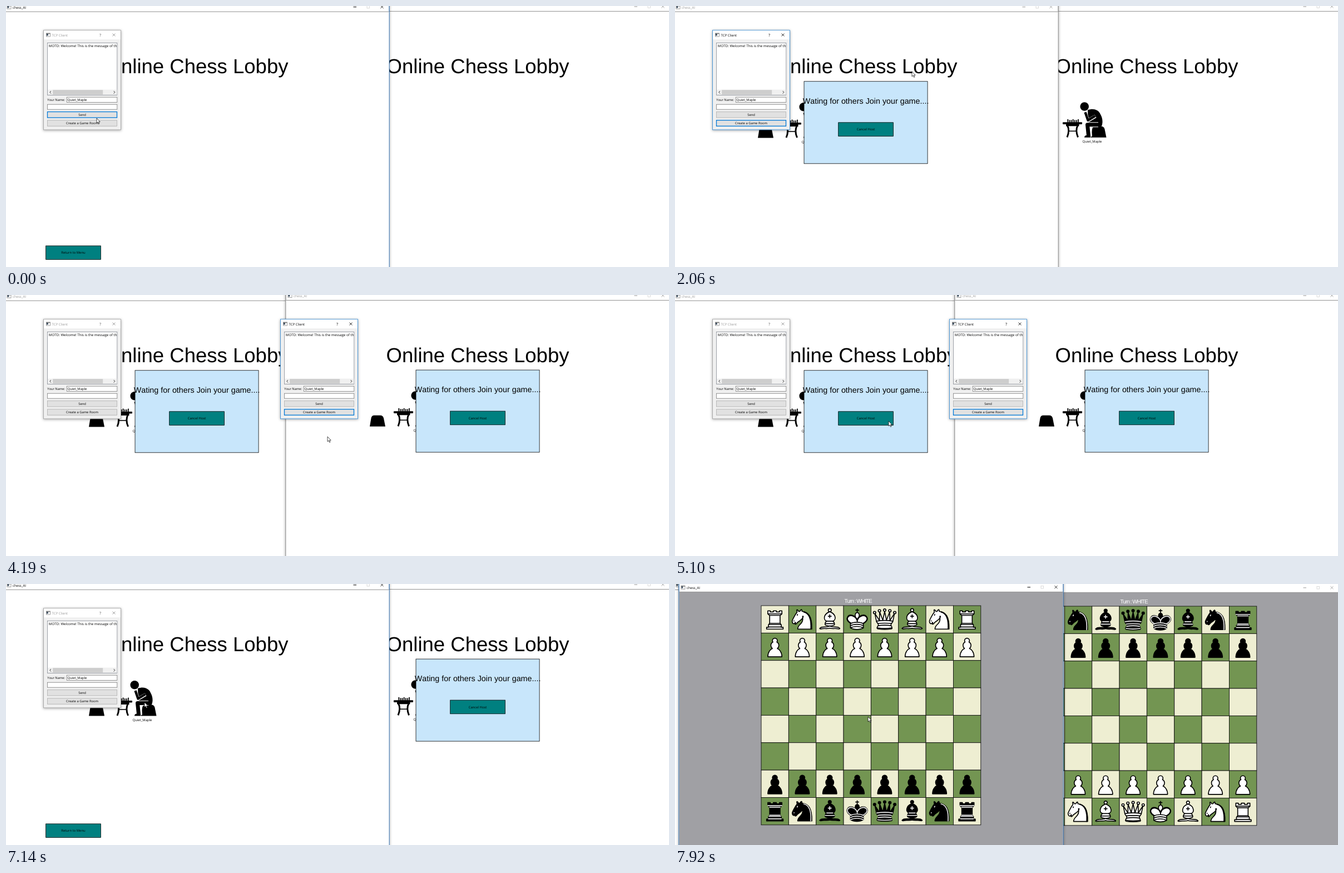
Recreate the animation shown at these times as an HTML page. Size 1192 by 470 pixels, loop 8 s.

```html
<!DOCTYPE html>
<html lang="en">
<head>
<meta charset="utf-8">
<title>Online Chess Lobby</title>
<style>
  html, body { margin: 0; width: 100%; height: 100%; overflow: hidden; background: #fff; }
  svg { display: block; width: 100vw; height: 100vh; }
  text { text-rendering: geometricPrecision; font-kerning: none; white-space: pre; }
  .ui { font-family: "Open Sans", "Noto Sans", sans-serif; }
  .big { font-family: "Liberation Sans", Arial, sans-serif; }
  .shadow { filter: drop-shadow(0 1px 2.5px rgba(0, 0, 0, .35)); }
</style>
</head>
<body>
<svg viewBox="0 0 1192 470">
  <g id="scene"></g>
  <path id="cursor" d="M0 0V9L2.1 7.1L3.6 10.4L5 9.8L3.6 6.6H6.2Z" fill="#fff" stroke="#000" stroke-width=".7"/>
</svg>
<script>
const LOOP = 8000;
const PLAYER = 'Quiet_Maple';
const INK = '#000', DIM = '#999', BLUE = '#0078d7', TEAL = '#008080';

// Moments at which the interface changes state
const AT = {
  hover1: 90, focus1: 470, host1: 704, raise2: 2430, hover2: 3290,
  focus2: 3520, host2: 3790, raise1: 5180, cancel1: 5330, game: 7220
};

// Pointer runs: start, end, number of steps, then [progress, x, y] waypoints
const RUNS = [
  [90, 320, 4, [[1, 150, 211]]],
  [470, 1250, 11, [[.3, 150, 211], [1, 365, 187]]],
  [1320, 2110, 11, [[.5, 787, 140], [.909, 426, 118], [1, 400, 90]]],
  [2200, 2660, 7, [[.5, 720, 150], [1, 700, 190]]],
  [2820, 3600, 11, [[.727, 567, 208], [1, 567, 210]]],
  [3700, 4500, 10, [[.2, 567, 210], [.6, 578, 255], [1, 521, 318]]],
  [4570, 4950, 6, [[1, 393, 235]]],
  [5100, 5330, 4, [[.5, 375, 219], [1, 375, 219]]],
  [5520, 6030, 8, [[.25, 401, 243], [.6, 407, 260], [1, 395, 271]]],
  [6350, 6820, 7, [[1, 249, 219]]],
  [7140, 7220, 2, [[.5, 249, 213], [1, 248, 208]]],
  [7600, 7920, 5, [[1, 347, 239]]]
];

function pointer(t) {
  let pos = [163, 202];
  for (const [a, b, n, way] of RUNS) {
    if (t < a) break;
    const p = Math.min(n, Math.floor((t - a) / (b - a) * (n - 1) + 1e-6) + 1) / n;
    let p0 = 0;
    for (const [p1, x, y] of way) {
      const f = Math.min(1, (p - p0) / (p1 - p0));
      pos = [pos[0] + (x - pos[0]) * f, pos[1] + (y - pos[1]) * f];
      if (p <= p1) break;
      p0 = p1;
    }
  }
  return pos;
}

const group = (x, y, body, scale = 1) => `<g transform="translate(${x} ${y}) scale(${scale})">${body}</g>`;
const rect = (x, y, w, h, fill, stroke = 'none', sw = 1, extra = '') =>
  `<rect x="${x}" y="${y}" width="${w}" height="${h}" fill="${fill}" stroke="${stroke}" stroke-width="${sw}" ${extra}/>`;
const line = (d, stroke, sw = 1) => `<path d="${d}" fill="none" stroke="${stroke}" stroke-width="${sw}" stroke-linejoin="round"/>`;
const shape = d => `<path d="${d}"/>`;
const label = (x, y, s, size = 5.9, fill = INK, anchor = 'start', cls = 'ui', extra = '') =>
  `<text class="${cls}" x="${x}" y="${y}" font-size="${size}" fill="${fill}" text-anchor="${anchor}" ${extra}>${s}</text>`;
const cross = (x, y, r, c) => line(`M${x - r} ${y - r}l${2 * r} ${2 * r}m0 ${-2 * r}l${-2 * r} ${2 * r}`, c, .8);
const icon = (x, y) => rect(x, y, 7, 6, '#fff', '#888', .8) + rect(x + .4, y + .4, 3, 4, '#456') + rect(x, y, 7, 1.3, '#777');

function frame(x, y, active, bg, body) {
  const c = active ? INK : DIM;
  return group(x, y,
    rect(-2, -20, 691, 520, '#fff', active ? '#2b6cb0' : '#858585', 1.2, 'class="shadow"') +
    rect(-1.4, 10.2, 689.8, 480, bg) +
    line('M-1.4 10.3H688.4', '#909090') +
    icon(2, -.8) + label(12, 4.5, 'chess_AI', 6.05, c) +
    line('M624.5 1.8h5.5', c) + rect(649, -.6, 4.6, 4.6, 'none', '#ccc', .7) + cross(676, 1.6, 2.6, c) + body);
}

// The lobby is laid out on a 1400 by 900 canvas shown at about half size
const canvas = body => group(-2.4, 12.4, body, .4935);
const tealButton = (x, y, s) => rect(x, y, 200, 50, TEAL, INK, 1.6) + label(x + 100, y + 29.3, s, 12, INK, 'middle');
const hostBox = () => rect(475, 250, 450, 300, '#c8e6fb', INK, 1.6) +
  label(700, 331, 'Wating for others Join your game....', 29, INK, 'middle', 'big') +
  tealButton(600, 400, 'Cancel Host');

function thinker() {
  const stool = 'M0 20L2.5 5Q3.5 0 8 0H19Q23.5 0 25 5L28 20Z';
  let men = '';
  for (let i = 0; i < 7; i++) {
    const x = 200.5 + i * 3.1, y = i % 3 ? 207 : 205.5;
    men += rect(x, y, 1.7, 5, INK) + `<circle cx="${x + .85}" cy="${y}" r="1"/>`;
  }
  return group(149, 217.5, shape(stool)) + men +
    rect(192, 210, 35, 3.6, INK, 'none', 1, 'rx="1"') +
    rect(198, 213, 23.5, 4, INK) +
    line('M200 215C204 222 203 230 200 237M219.5 215C215.5 222 216.5 230 219.5 237', INK, 3) +
    line('M202 226H218', INK, 1.6) +
    group(242.5, 217.5, shape(stool)) +
    shape('M237 188C248 184 257 188 260 196C264 203 265 212 261 219H238Z') +
    line('M256 214.5H239L240.5 236', '#fff', 9) +
    line('M256 214.5H236.5L238.5 234', INK, 7) +
    shape('M231 237.5Q231 234 235 233.5H242V237.5Z') +
    line('M233 194L237.5 207L251 199', '#fff', 6) +
    line('M232.5 192L237.5 206.5L250.5 198.5', INK, 4.4) +
    '<circle cx="231.2" cy="181.7" r="7.8"/>' +
    label(227.6, 247, PLAYER);
}

const lobby = (games, hosting) =>
  canvas(label(700, 220.5, 'Online Chess Lobby', 74, INK, 'middle', 'big')) +
  (games ? thinker() : '') +
  canvas(hosting ? hostBox() : tealButton(150, 850, 'Return to Menu'));

function pushButton(y, s, look) {
  const [fill, stroke, sw] = { plain: ['#e1e1e1', '#adadad', .8], focus: ['#e1e1e1', BLUE, 1.3], hover: ['#e3e9ef', '#9db8d0', .8] }[look];
  return rect(74.5, y, 125, 10.6, fill, stroke, sw) + label(137, y + 7.6, s, 5.85, INK, 'middle');
}

function client(x, active, send, create) {
  const c = active ? INK : DIM;
  return group(x, 0,
    rect(67.5, 43.7, 139, 179.2, '#f0f0f0', active ? '#3a8fd6' : '#a4a4a4', .9, 'class="shadow"') +
    rect(68, 44.2, 138, 16, '#fff') +
    icon(72.5, 49) + label(82.5, 54.7, 'TCP Client', 6.05, c) +
    label(169.5, 54.6, '?', 7, active ? INK : '#555', 'middle') + cross(194, 52, 2.5, active ? INK : '#888') +
    rect(74.4, 66.5, 125.4, 94, '#fff', '#828790', .8) +
    label(76.8, 74.4, 'MOTD: Welcome! This is the message of th', 6.2) +
    rect(75, 150.6, 124.4, 9.4, '#f0f0f0') + rect(84.2, 151.2, 90, 8.2, '#cdcdcd') +
    line('M81 153l-2.2 2.3 2.2 2.3M193.6 153l2.2 2.3-2.2 2.3', '#333', 1) +
    label(74.2, 171, 'Your Name:', 5.8) +
    rect(109.3, 164.2, 90.5, 9.4, '#fff', '#7a7a7a', .8) + label(110.6, 171, PLAYER) +
    rect(74.4, 177.2, 125.4, 9, '#fff', '#7a7a7a', .8) +
    pushButton(190.5, 'Send', send) + pushButton(205.7, 'Create a Game Room', create));
}

// Pieces on a 45 unit square: [outline, inner lines]
const PIECES = {
  p: ['M22.5 9c-2.2 0-4 1.8-4 4 0 .9.3 1.7.8 2.4C17.3 16.5 16 18.6 16 21c0 2 .9 3.8 2.4 5-3 1.1-7.4 5.6-7.4 13.5h23c0-7.9-4.4-12.4-7.4-13.5 1.5-1.2 2.4-3 2.4-5 0-2.4-1.3-4.5-3.3-5.6.5-.7.8-1.5.8-2.4 0-2.2-1.8-4-4-4z', ''],
  r: ['M9 39v-3h3v-4l2-2.5V17l-3-3V9h4v2h5V9h5v2h5V9h4v5l-3 3v12.5l2 2.5v4h3v3z', 'M12 35.5h21M13 31.5h19M14 29.5h17M14 16.5h17M11 14h23'],
  n: ['M22 10c10.5 1 16.5 8 16 29H15c0-9 10-6.5 8-21M24 18c.4 2.9-5.6 7.4-8 9-3 2-2.8 4.3-5 4-1-.9 1.4-3 0-3-1 0 .2 1.2-1 2-1 0-4 1-4-4 0-2 6-12 6-12s1.9-1.9 2-3.5c-.7-1-.5-2-.5-3 1-1 3 2.5 3 2.5h2s.8-2 2.5-3c1 0 1 3 1 3', 'M25 11.2C33 13 37.3 22 36.4 39M9 25.5v.4M14.7 15l-.5 1.2'],
  b: ['M9 36c3.4-1 10.1.4 13.5-2 3.4 2.4 10.1 1 13.5 2 0 0 1.7.5 3 2-.7 1-1.7 1-3 .5-3.4-1-10.1.5-13.5-1-3.4 1.5-10.1 0-13.5 1-1.4.5-2.3.5-3-.5 1.4-1.5 3-2 3-2zM15 32c2.5 2.5 12.5 2.5 15 0 .5-1.5 0-2 0-2 0-2.5-2.5-4-2.5-4 5.5-1.5 6-11.5-5-15.5-11 4-10.5 14-5 15.5 0 0-2.5 1.5-2.5 4 0 0-.5.5 0 2zM25 8a2.5 2.5 0 1 1-5 0 2.5 2.5 0 1 1 5 0z', 'M17.5 26h10M15 30h15M22.5 15.5v5M20 18h5'],
  q: ['M9 26l-2.5-12.5L14 25l.3-14.1 5.2 13.6 3-14.5 3 14.5 5.2-13.6L31 25l7.5-11.5L36 26c0 2-1.5 2-2.5 4-1 1.5-1 1-.5 3.5 1.5 1 1 2.5 1 2.5 1.5 1.5 0 2.5 0 2.5-6.5 1-16.5 1-23 0 0 0-2-1-.5-2.5 0 0 0-1.5 1.5-2.5.5-2.5.5-2-.5-3.5-1-2-2.5-2-2.5-4z' +
    [[6, 12], [14, 9], [22.5, 8], [31, 9], [39, 12]].map(([x, y]) => `M${x - 2} ${y}a2 2 0 1 1 4 0a2 2 0 1 1-4 0z`).join(''),
    'M9.5 26c8.5-1.5 18-1.5 26 0M11.5 30c3.5-1 18.5-1 22 0M12 33.5c6-1 15-1 21 0M11 37c6 1 17 1 23 0'],
  k: ['M22.5 11.6V6M20 8h5M22.5 25s4.5-7.5 3-10.5c0 0-1-2.5-3-2.5s-3 2.5-3 2.5c-1.5 3 3 10.5 3 10.5M11.5 37c5.5 3.5 15.5 3.5 21 0v-7s9-4.5 6-10.5c-4-6.5-13.5-3.5-16 4V27v-3.5c-3.5-7.5-13-10.5-16-4-3 6 5 10 5 10z',
    'M11.5 30c5.5-3 15.5-3 21 0m-21 3.5c5.5-3 15.5-3 21 0m-21 3.5c5.5-3 15.5-3 21 0M32 29.5s8.5-4 6-9.6C34.2 14 25 18 22.5 24.5v2.1-2.1C20 18 10.9 14 7 19.9 4.5 25.5 13 29.5 13 29.5']
};

function piece(type, white) {
  const [body, inner] = PIECES[type];
  return `<g transform="translate(-.2 -.7) scale(1.1)" stroke-width="1.5" stroke-linecap="round" stroke-linejoin="round">` +
    `<path d="${body}" fill="${white ? '#fff' : '#000'}" stroke="#000"/>` +
    `<path d="${inner}" fill="none" stroke="${white ? '#000' : '#ececec'}"/></g>`;
}

function board(rank, whiteOnTop) {
  const size = 49.35;
  let out = label(320, 29.6, 'Turn : WHITE', 10, '#fff', 'middle', 'big', 'letter-spacing="-1"');
  for (let r = 0; r < 8; r++) for (let c = 0; c < 8; c++) {
    const type = r === 0 || r === 7 ? rank[c] : r === 1 || r === 6 ? 'p' : '';
    out += group(146 + c * size, 35 + r * size,
      rect(0, 0, size, size, (r + c) % 2 ? '#739552' : '#eeeed2', '#111', .9) +
      (type ? piece(type, r < 4 === whiteOnTop) : ''));
  }
  return out;
}

function scene(on) {
  if (on.game) {
    const gray = '#a0a0a4';
    return frame(0, 0, false, '#fff', '') +
      frame(505, 5, false, gray, board('rnbqkbnr', false)) +
      frame(9, 4, true, gray, board('rnbkqbnr', true));
  }
  const rightOnTop = on.raise2 && !on.raise1;
  const clientOne = on.focus1 && !on.raise2, clientTwo = on.focus2 && !on.raise1;
  const left =
    frame(0, 0, !rightOnTop && !clientOne, '#fff', lobby(on.host1, on.host1 && !on.cancel1)) +
    client(0, clientOne, on.focus1 ? 'plain' : 'focus', clientOne ? 'focus' : on.hover1 && !on.focus1 ? 'hover' : 'plain');
  const right =
    frame(505, -.7, rightOnTop && !clientTwo, '#fff', lobby(on.host1, on.host2)) +
    client(426, clientTwo, 'plain', clientTwo ? 'focus' : on.hover2 ? 'hover' : 'plain');
  return rightOnTop ? left + right : right + left;
}

const stage = document.getElementById('scene');
const arrow = document.getElementById('cursor');
let shown = '';

function draw(t) {
  const on = {};
  for (const name in AT) on[name] = t >= AT[name];
  const key = Object.values(on).join();
  if (key !== shown) {
    stage.innerHTML = scene(on);
    shown = key;
  }
  arrow.setAttribute('transform', `translate(${pointer(t).join(' ')})`);
}

const start = performance.now();
function tick() {
  draw((performance.now() - start) % LOOP);
  requestAnimationFrame(tick);
}
tick();
</script>
</body>
</html>
```
